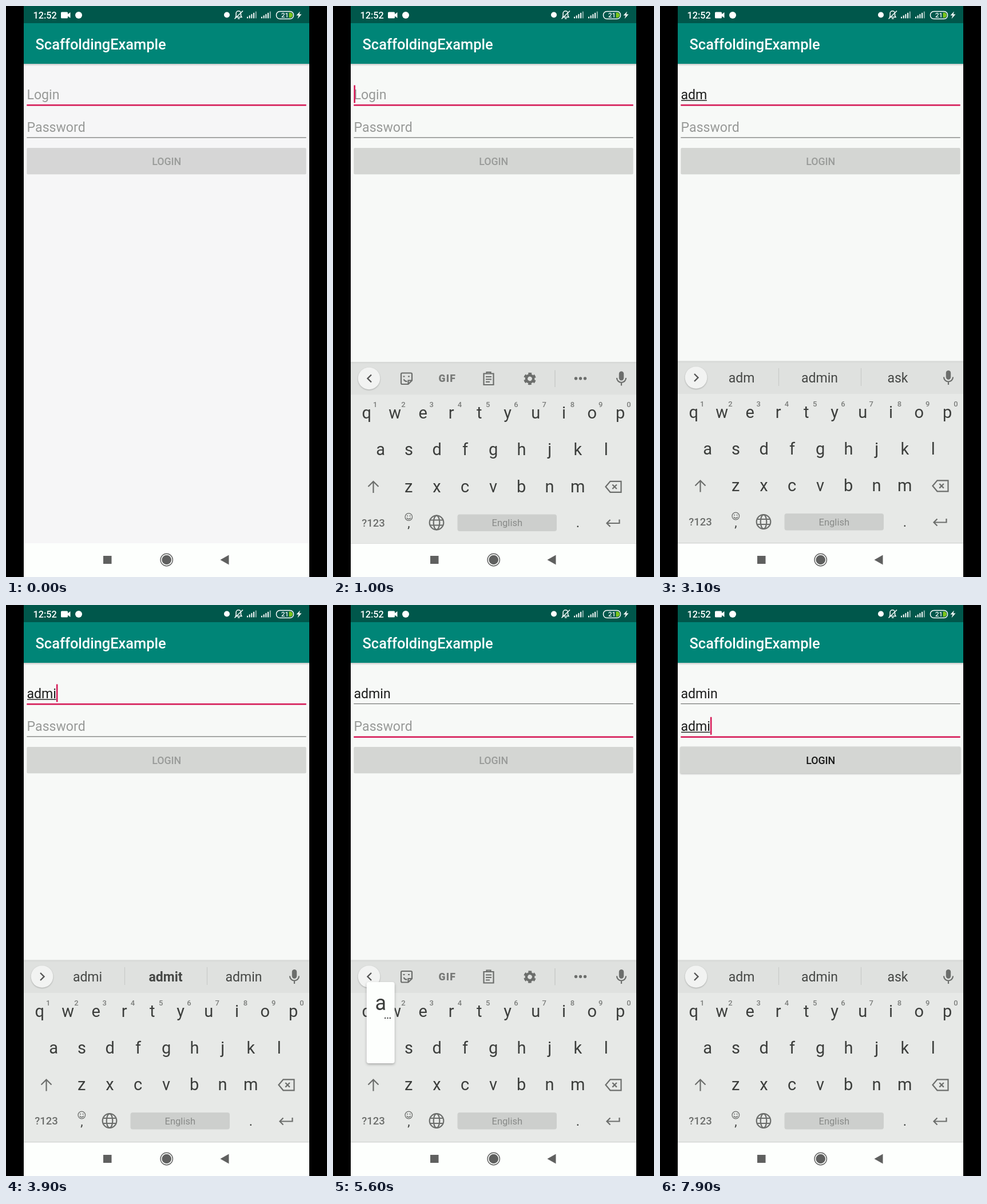
Write an HTML page that moves like this. It is 561 px wide and 998 px high and loops after 8 s.

```html
<!DOCTYPE html>
<html lang="en">
<head>
<meta charset="utf-8">
<title>Login form</title>
<style>
  html, body { margin: 0; width: 100%; height: 100%; overflow: hidden; background: #000; }
  svg { display: block; width: 561px; height: 998px; font-family: Roboto, sans-serif; }
  .mid { text-anchor: middle; }
  .med { font-weight: 500; }
  .field { font-size: 23.1px; font-kerning: none; }
  .line { fill: none; stroke: #6c6e6c; stroke-width: 2.2; }
  .thin { stroke-width: 1.3; }
  .white { fill: none; stroke: #fff; stroke-width: 1.5; }
  .lift { filter: drop-shadow(0 2px 2px rgba(0,0,0,.28)); }
</style>
</head>
<body>
<svg viewBox="0 0 561 998">
  <defs>
    <clipPath id="screen"><rect x="31" width="499" height="940"/></clipPath>
    <linearGradient id="shade" x2="0" y2="1">
      <stop stop-color="#000" stop-opacity=".2"/>
      <stop offset="1" stop-color="#000" stop-opacity="0"/>
    </linearGradient>
  </defs>
  <rect width="561" height="998"/>
  <rect id="page" x="31" width="499" height="998"/>
  <rect x="31" y="939" width="499" height="59" fill="#fdfffd"/>

  <!-- status bar -->
  <rect x="31" width="499" height="30.5" fill="#00574b"/>
  <g fill="#fff">
    <text class="med" x="47.5" y="21.5" font-size="16.3">12:52</text>
    <rect x="96" y="10.5" width="12" height="11" rx="1.5"/>
    <path d="M107 15l5.5-4v10l-5.5-4z"/>
    <circle cx="127" cy="16" r="6"/>
    <circle cx="386" cy="15.5" r="5"/>
    <path class="white" d="M401.500 19.500h10.500l-1.500-2.500v-4a4.200 4.200 0 0 0-8.400 0v4zM405 22h3.500M399.500 22.500L414 8.500"/>
    <g id="bars"></g>
    <rect class="white" x="472.500" y="9.500" width="30" height="13" rx="6"/>
    <path d="M494.500 11.500h2a4.500 4.500 0 0 1 0 9h-2z" fill="#7cc51c"/>
    <text class="mid med" x="487.500" y="20" font-size="11.500">21</text>
    <path d="M514 9.500l-6.500 7h4l-2 6 7-8h-4z"/>
  </g>

  <!-- app bar -->
  <rect x="31" y="30" width="499" height="71" fill="#008577"/>
  <rect x="31" y="101" width="499" height="4" fill="url(#shade)"/>
  <text class="med" x="51.500" y="76.300" font-size="25.400" fill="#fff">ScaffoldingExample</text>

  <!-- form -->
  <g id="form"></g>
  <rect id="button" rx="2"/>
  <text id="label" class="mid med" x="280.700" y="278.300" font-size="17.800">LOGIN</text>

  <!-- navigation -->
  <g fill="#5f605f">
    <rect x="170" y="961" width="14.500" height="14"/>
    <circle cx="280.700" cy="968" r="8.300"/>
    <circle cx="280.700" cy="968" r="10.700" fill="none" stroke="#5f605f" stroke-width="1.400"/>
    <path d="M374.500 968l15-8.500v17z"/>
  </g>

  <g clip-path="url(#screen)"><g id="board">
    <rect x="31" y="620.500" width="499" height="319" fill="#e7e9e7"/>
    <rect x="31" y="620.500" width="499" height="57.500" fill="#dfe1df"/>
    <rect x="31" y="620.500" width="499" height="4" fill="url(#shade)" opacity=".25"/>
    <rect x="31" y="938" width="499" height="1.200" fill="#d3d5d3"/>
    <circle cx="63" cy="649.500" r="19.300" fill="#f2f3f2" style="filter:drop-shadow(0 1px 1px rgba(0,0,0,.25))"/>
    <path id="chevron" fill="none" stroke="#555" stroke-width="2.400"/>
    <g fill="#6c6e6c">
      <rect x="499.800" y="637" width="8.400" height="16" rx="4.200"/>
      <path class="line" d="M496 648.500a8 8 0 0 0 16 0M504 656.500v5.500"/>
    </g>

    <g id="tools">
      <path class="line" d="M121 640h15q2 0 2 2v11l-6.500 6.500h-10.500q-2 0-2-2v-15.500q0-2 2-2zM131.500 659v-6h6M123.500 651q2 4 6 3.500M122.500 646h3M131 646h3"/>
      <text class="mid" x="199.800" y="655.800" font-size="17.600" font-weight="800" letter-spacing="1.200" fill="#777977">GIF</text>
      <path class="line" d="M263.500 641h17v19.500h-17zM267 646.500h10M267 651h10M267 655.500h7M268.500 641v-2.500h7v2.500z"/>
      <g fill="none" stroke="#6c6e6c" transform="rotate(30 344 650)">
        <circle cx="344" cy="650" r="6.100" stroke-width="4.600"/>
        <circle cx="344" cy="650" r="9.300" stroke-width="3" stroke-dasharray="5.600 4.140" stroke-dashoffset="2.800"/>
      </g>
      <path d="M388 635v29.500" stroke="#c3c5c3" stroke-width="1.200"/>
      <g fill="#6c6e6c"><circle cx="424.500" cy="649.500" r="2.700"/><circle cx="432.500" cy="649.500" r="2.700"/><circle cx="440.500" cy="649.500" r="2.700"/></g>
    </g>
    <g id="words" class="mid" font-size="23" fill="#454745">
      <path d="M207.500 633v31M351.500 633v31" stroke="#c8cac8" stroke-width="1.200"/>
    </g>

    <g id="keys" class="mid" fill="#3c3e3c"></g>
    <path class="line" d="M70.500 849.500v-20M61.500 838.500l9-9 9 9"/>
    <path class="line" d="M484.500 829.300h19v19h-19l-8-9.500zM488.300 835l7.600 7.600M495.900 835l-7.600 7.600"/>
    <text class="mid med" x="70.500" y="908.300" font-size="18.500" fill="#6c6e6c">?123</text>
    <circle class="line thin" cx="132.300" cy="891.500" r="6.300"/>
    <path class="line thin" d="M128.800 893q3.500 4.500 7 0"/>
    <g fill="#6c6e6c"><circle cx="130" cy="889.700" r="1"/><circle cx="134.600" cy="889.700" r="1"/></g>
    <text class="mid" x="132.300" y="910" font-size="22" fill="#3c3e3c">,</text>
    <g class="line"><circle cx="181" cy="901.500" r="12.300"/><ellipse cx="181" cy="901.500" rx="5.300" ry="12.300"/><path d="M169.500 897h23M169.500 906h23"/></g>
    <rect x="217.500" y="887" width="173.500" height="29.500" rx="4" fill="#cdcfcd"/>
    <text class="mid" x="304.300" y="908" font-size="16.600" fill="#888a88">English</text>
    <text class="mid" x="428" y="910" font-size="24" fill="#3c3e3c">.</text>
    <path class="line" d="M500.500 896v6.500h-22M484.500 896.500l-6 6 6 6"/>
    <g id="popup" class="mid" fill="#3c3e3c">
      <rect class="lift" x="-24.500" y="-115" width="49" height="142" rx="4" fill="#fdfffd"/>
      <text id="big" y="-66" font-size="36"></text>
      <g id="more"><circle cx="8" cy="-52" r="1.200"/><circle cx="12.300" cy="-52" r="1.200"/><circle cx="16.600" cy="-52" r="1.200"/></g>
    </g>
  </g></g>
</svg>
<script>
const NS = 'http://www.w3.org/2000/svg';
const LOOP = 8000, STEP = 100, BLINK = 500;
const FOCUS = 600, SLIDE = 480;
const PINK = '#d61b58';
const $ = id => document.getElementById(id);

function set(el, attrs) {
  for (const k in attrs) el.setAttribute(k, attrs[k]);
  return el;
}
function add(parent, tag, attrs, text) {
  const el = set(document.createElementNS(NS, tag), attrs);
  if (text !== undefined) el.textContent = text;
  return parent.appendChild(el);
}
const show = (el, on) => { el.style.display = on ? '' : 'none'; };

// Signal strength
for (const x of [421, 446])
  for (let i = 0; i < 5; i++)
    add($('bars'), 'rect', { x: x + i * 3.7, y: 18.8 - i * 2.3, width: 2, height: 2.7 + i * 2.3, opacity: i < 4 ? 1 : .55 });

// Letter keys
const keyAt = {};
[['qwertyuiop', 58.8], ['asdfghjkl', 83.2], ['zxcvbnm', 132.2]].forEach(([row, x0], r) => {
  const y = 709.6 + r * 64.3;
  [...row].forEach((ch, i) => {
    const x = x0 + i * 49.25;
    keyAt[ch] = { x, y };
    add($('keys'), 'text', { x, y: y + 10, 'font-size': 29 }, ch);
    if (r === 0) add($('keys'), 'text', { x: x + 15, y: y - 10, 'font-size': 13, fill: '#7b7d7b', class: 'med' }, (i + 1) % 10);
  });
});

const slots = [142.5, 279, 415.5].map(x => add($('words'), 'text', { x, y: 658 }));

// Each field owns its text, composing line, base line and caret
const fields = [['Login', 163, 172], ['Password', 220.3, 229.4]].map(([hint, y, base]) => ({
  hint, base,
  text: add($('form'), 'text', { x: 36.5, y, class: 'field' }),
  compose: add($('form'), 'rect', { x: 37, y: y + 1.3, height: 1.5, fill: '#222' }),
  rule: add($('form'), 'rect', { x: 36.3, width: 488.4 }),
  caret: add($('form'), 'rect', { y: y - 24.5, width: 2.6, height: 31, fill: PINK })
}));

// [time, focused field, its text]
const edits = [
  [0, 0, ''], [FOCUS, 0, ''], [1900, 0, 'a'], [2300, 0, 'ad'], [2600, 0, 'adm'], [3800, 0, 'admi'], [4100, 0, 'admin'],
  [4700, 1, ''], [5700, 1, 'a'], [6300, 1, 'ad'], [6700, 1, 'adm'], [7900, 1, 'admi']
];
// [from, to, key]
const presses = [
  [1700, 1900, 'a'], [2100, 2300, 'd'], [3600, 3800, 'i'], [4000, 4100, 'n'],
  [5500, 5700, 'a'], [6600, 6700, 'm'], [7600, 7900, 'i']
];
const guesses = {
  a: ['a', 'and', 'actually'],
  ad: ['ad', 'as', 'admin'],
  adm: ['adm', 'admin', 'ask'],
  admi: ['admi', 'admit', 'admin'],
  admin: ['admin', 'admins', 'admit']
};

const editAt = t => edits.filter(e => e[0] <= t).pop() || edits[0];

function drawFields(t) {
  const [since, focus, typed] = editAt(t);
  const lit = t >= FOCUS && Math.floor((t - since) / BLINK) % 2 === 0;
  fields.forEach((f, i) => {
    const active = i === focus;
    const value = active ? typed : i < focus ? 'admin' : '';
    f.text.textContent = value || f.hint;
    set(f.text, { fill: value ? '#1c1d1c' : '#989a98' });
    const width = value ? f.text.getComputedTextLength() : 0;
    show(f.compose, active && value);
    set(f.compose, { width: Math.max(0, width - 1) });
    set(f.rule, { y: f.base, height: active ? 2.6 : 1.2, fill: active ? PINK : '#737573' });
    show(f.caret, active && lit);
    set(f.caret, { x: 36.4 + width });
  });

  const ready = focus === 1 && typed.length > 3;
  set($('button'), {
    x: ready ? 35.3 : 36.3, y: ready ? 247.5 : 248, width: ready ? 490 : 488.4, height: ready ? 47 : 46.2,
    fill: t < 400 ? '#d6d6d6' : '#d4d6d3'
  });
  $('button').style.filter = ready ? 'drop-shadow(0 1px 1px rgba(0,0,0,.25))' : '';
  set($('label'), { fill: ready ? '#161716' : '#999b99' });
}

function drawBoard(t) {
  const p = Math.min(1, Math.max(0, (t - FOCUS) / SLIDE));
  show($('board'), p > 0);
  set($('board'), { transform: `translate(0 ${319 * (1 - p) ** 3})` });

  // Suggestions trail the typing by one step
  const list = editAt(t)[2] && guesses[editAt(t - STEP)[2]];
  show($('tools'), !list);
  show($('words'), list);
  set($('chevron'), { d: list ? 'M60 643l6.500 6.500-6.500 6.500' : 'M67 643l-6.500 6.500 6.500 6.500' });
  if (list) slots.forEach((slot, i) => {
    slot.textContent = list[i];
    set(slot, { 'font-weight': i === 1 && list[0] === 'admi' ? 700 : 400 });
  });

  const press = presses.find(([from, to]) => t >= from && t < to);
  show($('popup'), press);
  if (press) {
    const { x, y } = keyAt[press[2]];
    set($('popup'), { transform: `translate(${x} ${y})` });
    $('big').textContent = press[2];
    show($('more'), 'ain'.includes(press[2]));
  }
}

function draw(now) {
  const t = Math.floor((now % LOOP) / STEP) * STEP;
  set($('page'), { fill: t < 400 ? '#f6f6f7' : '#f7f9f7' });
  drawFields(t);
  drawBoard(t);
}

function tick() {
  draw(performance.now());
  requestAnimationFrame(tick);
}
tick();
</script>
</body>
</html>
```
